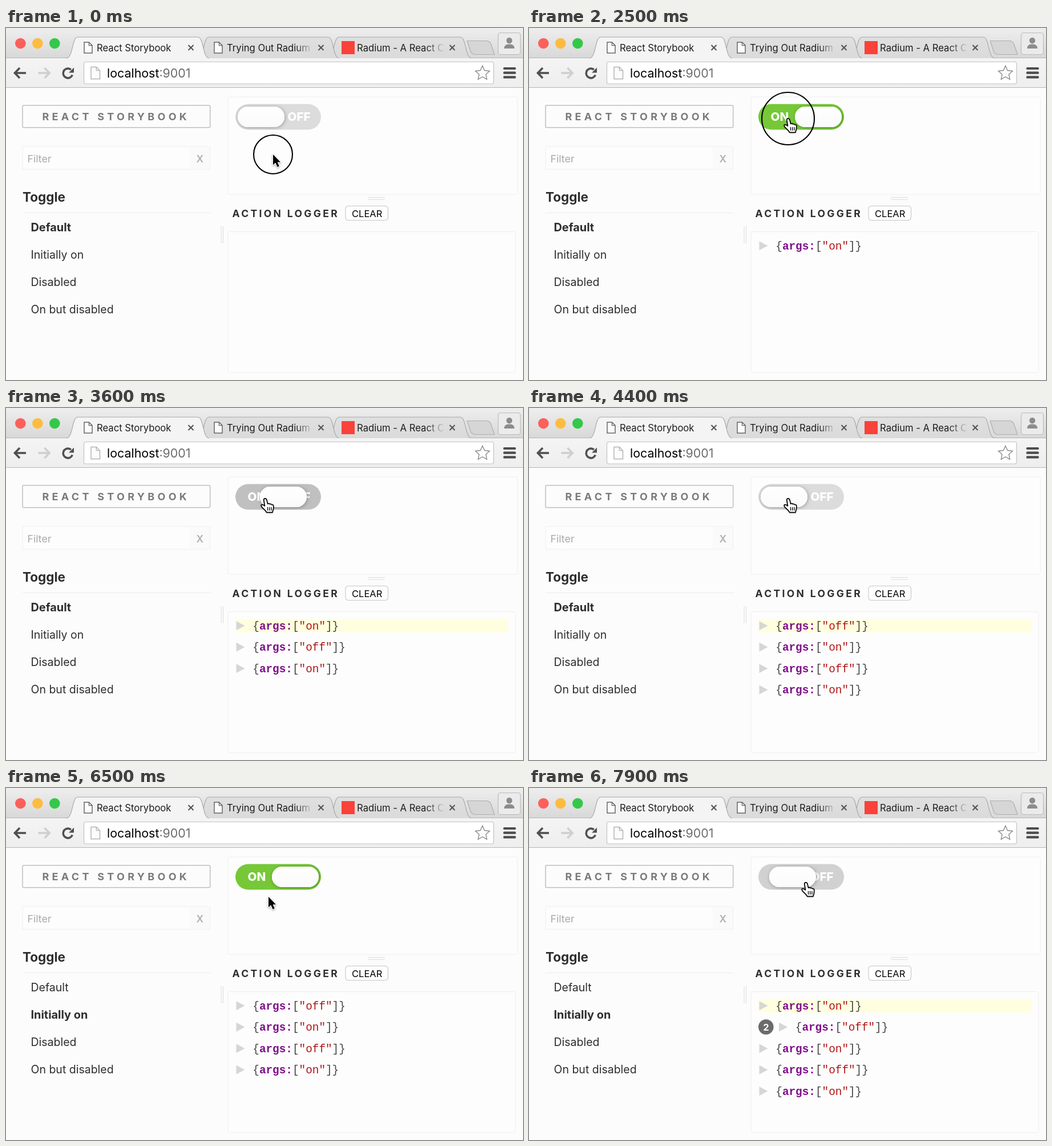
Write an HTML page with a canvas that moves like this. It is 906 px wide and 618 px high and loops after 8 s.

```html
<!DOCTYPE html>
<html lang="en">
<head>
<meta charset="utf-8">
<title>React Storybook</title>
<style>
html, body { margin: 0; width: 100%; height: 100%; overflow: hidden; background: #fcfcfc; }
canvas { display: block; width: 906px; height: 618px; }
</style>
</head>
<body>
<canvas id="stage" width="906" height="618"></canvas>
<script>
const ctx = document.getElementById('stage').getContext('2d');
const LOOP = 8000;
const SANS = 'Inter, Roboto, sans-serif';
const MONO = '"Liberation Mono", monospace';

// Mouse clicks; "to" flips the toggle and is logged, "story" opens a sidebar item.
const clicks = [
  { t: 60 },
  { t: 1385, to: 'on' },
  { t: 2640, to: 'off' },
  { t: 3480, to: 'on' },
  { t: 4150, to: 'off' },
  { t: 5950, story: 1 },
  { t: 6700, to: 'off' },
  { t: 7835, to: 'on' }
];
const moves = [
  [0, 468, 222], [350, 468, 222], [900, 454, 159], [4450, 454, 159],
  [4950, 508, 226], [5350, 508, 226], [5780, 100, 394], [6080, 100, 394],
  [6500, 460, 191], [6650, 485, 166], [LOOP, 485, 166]
];
const stories = ['Default', 'Initially on', 'Disabled', 'On but disabled'];
const ROW = 37.5;

const clamp = v => Math.max(0, Math.min(1, v));
const smooth = u => u * u * (3 - 2 * u);
const mix = (a, b, u) => `rgb(${a.map((v, i) => Math.round(v + (b[i] - v) * u))})`;

function text(str, x, y, size, color, weight = 400, spacing = 0, family = SANS) {
  ctx.font = `${weight} ${size}px ${family}`;
  ctx.letterSpacing = spacing + 'px';
  ctx.fillStyle = color;
  ctx.fillText(str, x, y);
}

function paint(fill, stroke, width = 1) {
  if (fill) { ctx.fillStyle = fill; ctx.fill(); }
  if (stroke) { ctx.strokeStyle = stroke; ctx.lineWidth = width; ctx.stroke(); }
}

function box(x, y, w, h, r, fill, stroke, width) {
  ctx.beginPath();
  ctx.roundRect(x, y, w, h, r);
  paint(fill, stroke, width);
}

function disc(x, y, r, fill, stroke, width) {
  ctx.beginPath();
  ctx.arc(x, y, r, 0, 7);
  paint(fill, stroke, width);
}

function poly(points, fill, stroke, width, close = true) {
  ctx.beginPath();
  points.forEach(([x, y]) => ctx.lineTo(x, y));
  if (close) ctx.closePath();
  paint(fill, stroke, width);
}

const line = (x1, y1, x2, y2, color, width) =>
  poly([[x1, y1], [x2, y2]], null, color, width, false);

function vertical(y1, y2, from, to) {
  const g = ctx.createLinearGradient(0, y1, 0, y2);
  g.addColorStop(0, from);
  g.addColorStop(1, to);
  return g;
}

function fade(x1, x2) {
  const g = ctx.createLinearGradient(x1, 0, x2, 0);
  g.addColorStop(0, '#1c1c1c');
  g.addColorStop(1, 'rgba(28,28,28,0)');
  return g;
}

function page(x, y, w, h, color) {
  const f = w * 0.4;
  poly([[x, y], [x + w - f, y], [x + w, y + f], [x + w, y + h], [x, y + h]], '#fcfcfc', color, 1.5);
  poly([[x + w - f, y], [x + w - f, y + f], [x + w, y + f]], null, color, 1.3, false);
}

function cross(x, y) {
  line(x - 4.5, y - 4.5, x + 4.5, y + 4.5, '#555', 2.1);
  line(x - 4.5, y + 4.5, x + 4.5, y - 4.5, '#555', 2.1);
}

function tab(x1, x2, fill) {
  ctx.beginPath();
  ctx.moveTo(x1, 53);
  ctx.bezierCurveTo(x1 + 12, 52, x1 + 9, 16, x1 + 20, 16);
  ctx.lineTo(x2 - 20, 16);
  ctx.bezierCurveTo(x2 - 9, 16, x2 - 12, 52, x2, 53);
  paint(fill, '#a9a9a9', 1.2);
}

function arrow(x, dir, color) {
  line(x, 79, x + dir * 21, 79, color, 3.6);
  poly([[x + dir * 10, 70], [x + dir * 1.5, 79], [x + dir * 10, 88]], null, color, 3.6, false);
}

function drawTabs() {
  ctx.fillStyle = vertical(0, 53, '#eeeeee', '#d8d8d8');
  ctx.fillRect(0, 0, 906, 53);
  ['#fc605b', '#fdbc40', '#34c84a'].forEach((c, i) => disc(25.3 + 30 * i, 27, 9.3, c));

  line(0, 52.5, 906, 52.5, '#b4b4b4', 1);
  const idle = vertical(16, 53, '#e0e0e0', '#dadada');
  tab(564, 816, idle);
  tab(336, 584, idle);
  ctx.fillStyle = vertical(53, 104, '#f4f4f4', '#eeeeee');
  ctx.fillRect(0, 53, 906, 51);
  tab(106, 356, '#f4f4f4');
  line(0, 104.5, 906, 104.5, '#b6b6b6', 1);

  page(137, 25, 14, 19, '#666');
  page(365, 25, 14, 19, '#666');
  box(588, 23, 23, 23, 0, '#f9423a');
  text('React Storybook', 159, 40.5, 16.65, '#1c1c1c');
  text('Trying Out Radium', 387, 40.5, 16.65, fade(508, 538));
  ctx.save();
  ctx.beginPath();
  ctx.rect(612, 20, 154, 30);
  ctx.clip();
  text('Radium - A React C', 615, 40.5, 16.65, fade(736, 769));
  ctx.restore();
  [324, 552, 782].forEach(x => cross(x, 34.5));

  ctx.lineJoin = 'round';
  poly([[808, 22.5], [844, 22.5], [849, 26], [856, 46.5], [820, 46.5], [815, 43]], '#d6d6d6', '#afafaf', 1.2);
  box(862.5, 8.5, 39, 38, 4, '#ebebeb', '#bcbcbc', 1.2);
  disc(882, 22, 5.2, '#8c8c8c');
  box(873, 28.5, 18, 7.5, [7, 7, 0, 0], '#8c8c8c');
  ctx.lineJoin = 'miter';
}

function drawToolbar() {
  arrow(14, 1, '#505050');
  arrow(77.5, -1, '#cfcfcf');
  ctx.beginPath();
  ctx.arc(108.5, 79.5, 8.3, 0.35, 5.4);
  paint(null, '#505050', 3.6);
  poly([[119, 69.5], [119, 78.5], [110, 78.5]], '#505050');

  box(136.5, 59.5, 718, 38.5, 3.5, '#fff', '#c3c3c3', 1.2);
  page(149, 68.5, 15.5, 21, '#b4b4b4');
  text('localhost', 177, 87, 21.4, '#000');
  text(':9001', 177 + ctx.measureText('localhost').width, 87, 21.4, '#6c6c6c');

  const star = [];
  for (let i = 0; i < 10; i++) {
    const a = i * Math.PI / 5 - Math.PI / 2, r = i % 2 ? 6.2 : 13;
    star.push([835 + r * Math.cos(a), 79.5 + r * Math.sin(a)]);
  }
  poly(star, '#fff', '#8a8a8a', 1.4);
  [71, 78.7, 86.4].forEach(y => box(871.5, y - 2.1, 22, 4.2, 1.5, '#4c4c4c'));
}

function drawSidebar(selected) {
  box(29, 135.7, 328.7, 39, 2, null, '#bfbfbf', 1.5);
  text('REACT STORYBOOK', 63.5, 162, 18, '#7a7a7a', 700, 5.3);
  box(29, 208, 328.5, 40, 2, '#fdfdfd', '#f0f0f0', 1.2);
  ctx.fillStyle = '#fafafa';
  ctx.fillRect(322, 209, 35, 38);
  text('Filter', 37.5, 235.5, 17.8, '#aaa');
  text('X', 333.5, 235.5, 17.5, '#b0b0b0', 600);
  text('Toggle', 29, 304.5, 22.5, '#2e2e2e', 700);
  line(29, 324.5, 359, 324.5, '#ededed', 1.2);
  stories.forEach((s, i) => {
    const on = i === selected;
    text(s, 43.5, 357 + 48 * i, on ? 19.9 : 19.5, '#2e2e2e', on ? 700 : 400);
  });
}

function drawPanels() {
  [377, 380.5].forEach(x => line(x, 348, x, 378, '#dcdcdc', 1));
  [297.5, 301].forEach(y => line(634, y, 664, y, '#dcdcdc', 1));
  box(389, 121, 507, 171, 4, '#fdfdfd', '#f0f0f0', 1.2);
  box(389, 357.7, 504, 247.3, 4, '#fdfdfd', '#f0f0f0', 1.2);
  text('ACTION LOGGER', 396.5, 331.5, 17.5, '#2e2e2e', 700, 3.35);
  box(595, 312.5, 74.5, 25, 5, '#fff', '#c6c6c6', 1.1);
  text('CLEAR', 606, 331.8, 16.5, '#000');
}

// 0 is off, 1 is on
function togglePosition(t) {
  let from = 0, to = 0, start = 0;
  for (const c of clicks) {
    if (c.t > t) break;
    if (c.story) from = to = 1;
    if (c.to) { from = to; to = c.to === 'on' ? 1 : 0; start = c.t; }
  }
  return from + (to - from) * smooth(clamp((t - start) / 200));
}

function drawToggle(p) {
  const off = [220, 220, 220], mid = [190, 190, 190], on = [118, 200, 56];
  const color = p < 0.7 ? mix(off, mid, p / 0.7) : mix(mid, on, (p - 0.7) / 0.3);
  const x = 406 + 60 * p;
  ctx.save();
  box(402, 133.5, 150, 45, 22.5, color);
  ctx.clip();
  text('ON', 423.5, 163.3, 20.6, '#fff', 800);
  text('OFF', 493.5, 163.3, 20.6, '#fff', 800);
  ctx.shadowColor = 'rgba(0,0,0,.3)';
  ctx.shadowBlur = 6;
  ctx.shadowOffsetX = 1;
  ctx.shadowOffsetY = 1;
  box(x, 138, 82, 36, 18, '#fff');
  ctx.restore();
  box(x, 138, 82, 36, 18, vertical(138, 174, '#ffffff', '#fafafa'));
}

// Equal neighbours merge into one counted row, except with the newest entry.
function logRows(done) {
  const rows = [];
  done.forEach((c, i) => {
    const top = rows[0];
    if (top && top.value === c.to && i < done.length - 1) top.count++;
    else rows.unshift({ value: c.to, count: 1 });
  });
  return rows;
}

function drawLog(t) {
  const done = clicks.filter(c => c.to && c.t <= t);
  if (!done.length) return;
  if (t - done[done.length - 1].t < 1000) {
    ctx.fillStyle = '#ffffdf';
    ctx.fillRect(402, 370.5, 478, 23.5);
  }
  logRows(done).forEach(({ value, count }, i) => {
    const y = 382.3 + ROW * i;
    let x = 403.5;
    if (count > 1) {
      disc(415.3, y - 0.3, 13.3, '#6b6b6b');
      text(count, 410.2, y + 5.8, 16.5, '#fff', 700);
      x += 34.5;
    }
    poly([[x, y - 8], [x + 15, y], [x, y + 8]], '#d6d6d6');
    x += 28.8;
    const parts = [['{', '#444'], ['args:', '#7f0f8a', 700], ['[', '#444'], [`"${value}"`, '#b01515'], [']}', '#444']];
    for (const [s, color, weight] of parts) {
      text(s, x, y + 6.4, 19.35, color, weight, 0, MONO);
      x += ctx.measureText(s).width;
    }
  });
}

function pointerAt(t) {
  const i = moves.findIndex((m, k) => k && t <= m[0]);
  const [t0, x0, y0] = moves[i - 1], [t1, x1, y1] = moves[i];
  const u = smooth((t - t0) / (t1 - t0));
  return [x0 + (x1 - x0) * u, y0 + (y1 - y0) * u];
}

const hand = new Path2D('M-2.3 1.5Q-2 -1 .5 -.8Q2.5 -.5 3 2L4.6 8.8Q6.5 7.2 8.2 9.2Q10.3 8 11.6 10.3Q14.3 9.6 14.8 12.2L14.6 17Q14 20 12.8 23.8L3 23.8Q0 19.5 -4 16Q-7.8 12.2 -6.6 10.6Q-4.5 9 -.6 12.4Z');

function drawPointer(x, y) {
  const overToggle = x > 402 && x < 552 && y > 134 && y < 178;
  const overStory = x > 30 && x < 358 && y > 334 && y < 510;
  ctx.save();
  ctx.translate(x, y);
  ctx.lineJoin = ctx.lineCap = 'round';
  ctx.shadowColor = 'rgba(0,0,0,.3)';
  ctx.shadowBlur = 3;
  ctx.shadowOffsetY = 1;
  if (overToggle || overStory) {
    ctx.translate(0, 0.6);
    ctx.fillStyle = '#fff';
    ctx.fill(hand);
    ctx.shadowColor = 'transparent';
    ctx.strokeStyle = '#000';
    ctx.lineWidth = 1.7;
    ctx.stroke(hand);
    [4.4, 7.6, 10.8].forEach(fx => line(fx, 14.8, fx + 0.2, 20, '#000', 1.3));
  } else {
    const shape = [[0, 0], [0, 18.5], [4.2, 14.6], [7.6, 22], [10.8, 20.6], [7.6, 13.6], [13, 13.6]];
    poly(shape, '#fff', '#fff', 2.6);
    ctx.shadowColor = 'transparent';
    poly(shape, '#000');
  }
  ctx.restore();
}

function draw(t) {
  ctx.fillStyle = '#fcfcfc';
  ctx.fillRect(0, 0, 906, 618);
  drawTabs();
  drawToolbar();
  drawSidebar(t < 5950 ? 0 : 1);
  drawPanels();
  drawToggle(togglePosition(t));
  drawLog(t);

  const [x, y] = pointerAt(t);
  const press = clicks.find(c => t >= c.t - 140 && t < c.t);
  if (press) disc(x, y, 46 - 15 * clamp((t - press.t + 140) / 100), null, '#000', 2.1);
  drawPointer(x, y);
}

let begin;
function tick(now) {
  if (begin === undefined) begin = now;
  draw((now - begin) % LOOP);
  requestAnimationFrame(tick);
}
requestAnimationFrame(tick);
</script>
</body>
</html>
```
